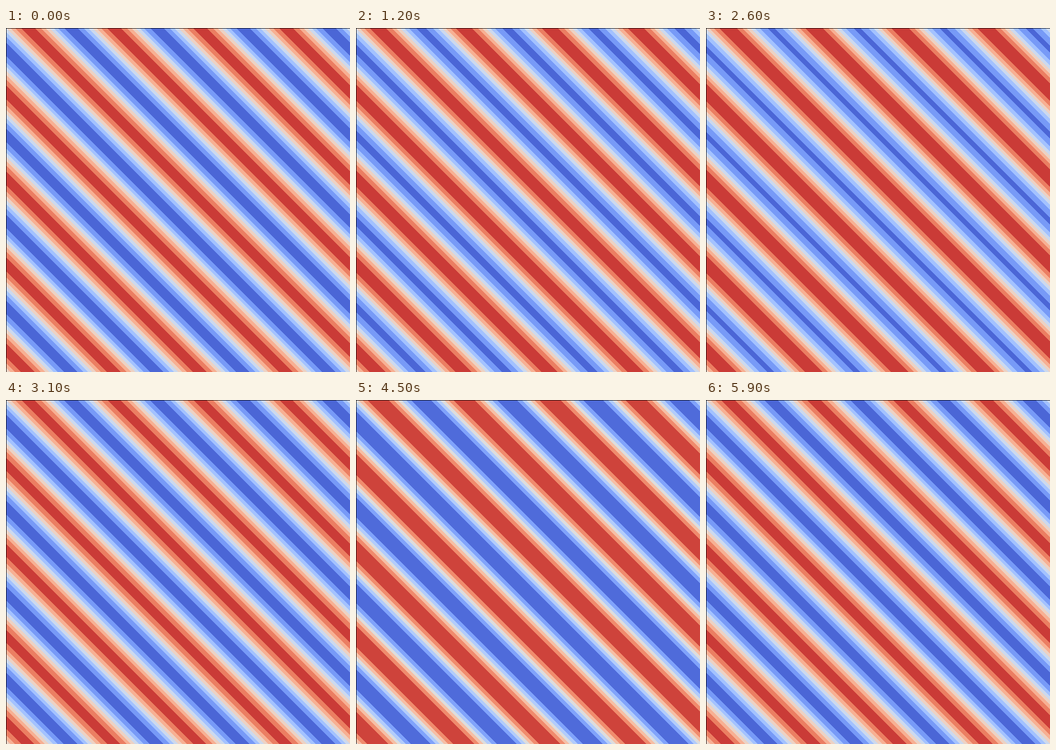
These frames come from a looping animation (748x748 px, 6000 ms). An HTML page with a canvas:

```html
<!DOCTYPE html>
<html lang="en">
<head>
<meta charset="utf-8">
<title>Diagonal wave</title>
<style>
  html, body { margin: 0; width: 100%; height: 100%; overflow: hidden; background: #000; }
  canvas { display: block; }
</style>
</head>
<body>
<canvas id="stage" width="748" height="748"></canvas>
<script>
const SIZE = 748, PERIOD = 187, SHIFT = 0.4, STEP = 0.3;
const FRAMES = 60, FRAME_MS = 100;

// Cool-to-warm band colours, keyed by the number of bands
const PALETTES = {
  7: ['4f6bda', '80a3fb', 'b2ccfb', 'dddddd', 'f6bfa5', 'f08b6d', 'ce433b'],
  8: ['4b66d6', '779af7', 'a3c2ff', 'ccd9ee', 'ecd2c4', 'f7b093', 'eb7e62', 'ca3b37']
};
const toPixel = hex => {
  const n = parseInt(hex, 16);
  return (0xff000000 | (n & 255) << 16 | (n & 0xff00) | n >> 16) >>> 0;
};
for (const n in PALETTES) PALETTES[n] = PALETTES[n].map(toPixel);

const ctx = document.getElementById('stage').getContext('2d');
const image = ctx.createImageData(SIZE, SIZE);
const pixels = new Uint32Array(image.data.buffer);
const diagonal = new Uint32Array(2 * SIZE);

function draw(frame) {
  // A still sine wave whose mean level swings; bands sit on multiples of STEP
  const angle = 4 * Math.PI * frame / (FRAMES - 1);
  const swing = -Math.sin(angle);
  const mean = swing + 0.006;
  const amplitude = 1.005 + 0.018 * Math.cos(angle) ** 2;
  const low = Math.floor((swing - 1) / STEP);
  const count = Math.ceil((swing + 1) / STEP) - low;
  const colors = PALETTES[count] || PALETTES[8];

  for (let s = 0; s < diagonal.length; s++) {
    const value = mean + amplitude * Math.sin(2 * Math.PI * (s + SHIFT) / PERIOD);
    const band = Math.floor(value / STEP) - low;
    diagonal[s] = colors[Math.max(0, Math.min(colors.length - 1, band))];
  }
  // The top row and left column stay black
  pixels.fill(0xff000000);
  for (let y = 1; y < SIZE; y++) {
    const start = SIZE - y;
    pixels.set(diagonal.subarray(start, start + SIZE - 1), y * SIZE + 1);
  }
  ctx.putImageData(image, 0, 0);
}

let shown = -1;
const startTime = performance.now();
function tick() {
  const elapsed = performance.now() - startTime;
  const frame = Math.floor(elapsed / FRAME_MS) % FRAMES;
  if (frame !== shown) draw(shown = frame);
  requestAnimationFrame(tick);
}
tick();
</script>
</body>
</html>
```
